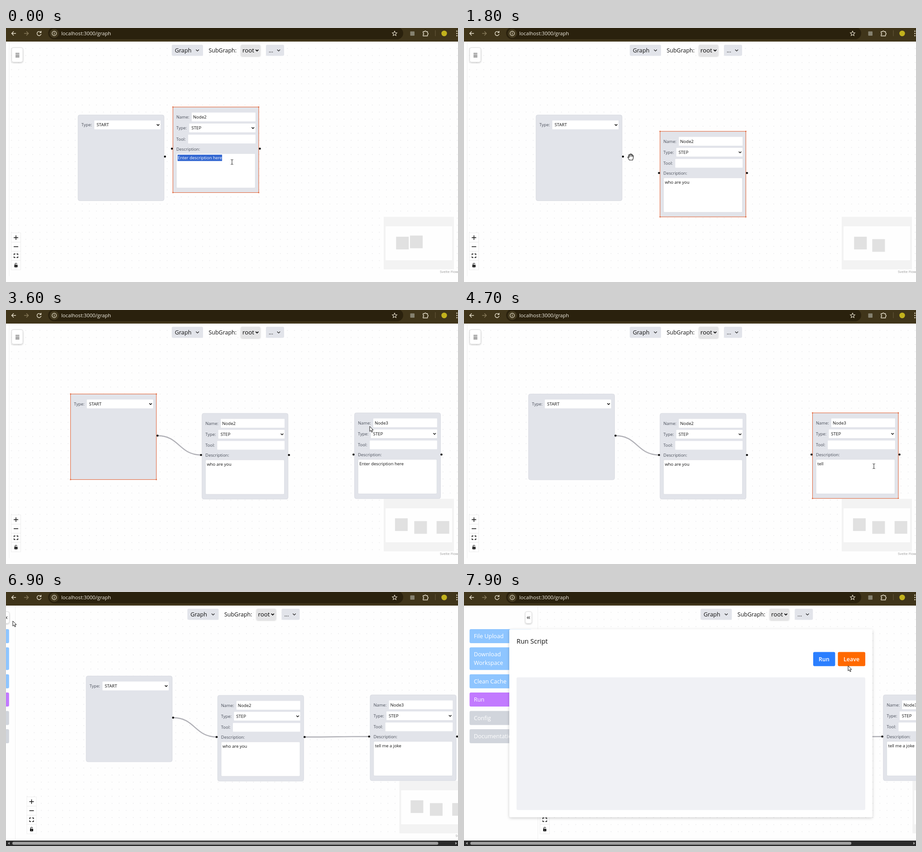
Animation, 998 px wide and 561 px high, one loop 8 s. Source, as an HTML page:

```html
<!DOCTYPE html>
<html lang="en">
<head>
<meta charset="utf-8">
<title>Graph editor</title>
<style>
  html, body { margin: 0; width: 100%; height: 100%; overflow: hidden; background: #fefefe; }
  svg { display: block; position: absolute; left: 0; top: 0; }
  text { font-family: "Open Sans", "Noto Sans", sans-serif; white-space: pre; }
</style>
</head>
<body>
<svg id="stage" width="998" height="561" viewBox="0 0 998 561" xmlns="http://www.w3.org/2000/svg">
  <defs>
    <pattern id="dots" x="4.4" y="37.2" width="15.62" height="15.62" patternUnits="userSpaceOnUse">
      <circle cx="7.8" cy="7.8" r=".55" fill="#b4b4ba"/>
    </pattern>
    <filter id="soft" x="-20%" y="-20%" width="140%" height="150%">
      <feDropShadow dx="0" dy="1.2" stdDeviation="1.5" flood-opacity=".22"/>
    </filter>
    <filter id="deep" x="-5%" y="-5%" width="110%" height="112%">
      <feDropShadow dx="0" dy="2" stdDeviation="3" flood-opacity=".2"/>
    </filter>
  </defs>
  <g id="page"></g>
  <g id="browser"></g>
  <g id="pointer"></g>
</svg>
<script>
const LOOP = 8000, STEP = 100;
const GREY = '#e2e4ea', EDGE = '#b1b1b7', LABEL = '#4a4f5a', ORANGE = '#e0673c';

// Tracks: [time, x, y, kind]
const tracks = {
  start: [[1900, 159, 192], [2400, 207.5, 211], [2700, 142.5, 185.5]],
  node2: [[1200, 368.5, 174.5], [1500, 432.8, 228.2]],
  shift: [[6800, 0, -156], [6900, 34.5, -142.5], [7000, 99, -76], [7100, 145, -18], [7200, 156.3, 0]],
  cursor: [
    [0, 499, 296, 'beam'], [1000, 499, 296, 'beam'],
    [1200, 480, 267, 'hand'], [1500, 544, 321, 'hand'], [1800, 368, 285, 'hand'],
    [1900, 348, 283, 'cross'], [2400, 396, 302, 'cross'], [2700, 331, 277, 'cross'],
    [2800, 335, 278, 'cross'], [3000, 430, 320, 'cross'], [3100, 520, 300, 'hand'],
    [3400, 800, 254, 'arrow'], [3600, 803, 257, 'arrow'], [3800, 803, 237, 'hand'],
    [4100, 905, 345, 'beam'], [5200, 905, 345, 'beam'], [5400, 720, 370, 'hand'],
    [5700, 625, 320, 'cross'], [5800, 645, 320, 'hand'], [6200, 739, 321, 'hand'],
    [6300, 767, 319, 'cross'], [6400, 720, 300, 'arrow'], [6700, 25, 62, 'arrow'],
    [6900, 15, 64, 'arrow'], [7300, 60, 238, 'arrow'], [7500, 70, 238, 'arrow'],
    [7900, 848, 163, 'arrow']
  ]
};

function at(track, t) {
  let a = track[0];
  for (const b of track) {
    if (t < b[0]) {
      const k = Math.max(0, (t - a[0]) / (b[0] - a[0] || 1));
      return { x: a[1] + (b[1] - a[1]) * k, y: a[2] + (b[2] - a[2]) * k, kind: a[3] };
    }
    a = b;
  }
  return { x: a[1], y: a[2], kind: a[3] };
}

const rect = (x, y, w, h, fill, r = 0, more = '') =>
  `<rect x="${x}" y="${y}" width="${w}" height="${h}" rx="${r}" fill="${fill}" ${more}/>`;
const text = (x, y, s, size, fill = '#111', more = '') =>
  `<text x="${x}" y="${y}" font-size="${size}" fill="${fill}" ${more}>${s}</text>`;
const line = (d, color, w = 1, more = '') =>
  `<path d="${d}" fill="none" stroke="${color}" stroke-width="${w}" ${more}/>`;
const dot = (x, y, r = 2.3, fill = '#111') => `<circle cx="${x}" cy="${y}" r="${r}" fill="${fill}"/>`;
const chevron = (x, y, s = 3, color = '#111', w = 1.5) =>
  line(`M${x - s} ${y - s / 2}l${s} ${s}l${s} ${-s}`, color, w);
const move = (x, y, body) => `<g transform="translate(${x} ${y})">${body}</g>`;

function frame(selected) {
  if (!selected) return rect(0, 0, 190, 189.5, GREY, 4, 'stroke="#d3d6dd" stroke-width=".8"');
  const corners = [[0, 0], [189.5, 0], [0, 189], [189.5, 189]];
  return rect(0, 0, 189.5, 189, GREY, 0, `stroke="${ORANGE}" stroke-width="1.1"`) +
    corners.map(([x, y]) => rect(x - 1.2, y - 1.2, 2.4, 2.4, ORANGE)).join('');
}

function field(label, y, x, value, select) {
  return text(7.5, y + 3.4, label, 9.4, LABEL) + rect(x, y - 9.7, 182.3 - x, 19.4, '#fff', 1) +
    text(x + (select ? 5 : 3), y + 3.4, value, 9.6) + (select ? chevron(176.7, y, 2.8) : '');
}

function startNode(p, selected) {
  return move(p.x, p.y, frame(selected) + field('Type:', 22, 36, 'START', true) + dot(192, 92));
}

function stepNode(p, name, note, selected, marked) {
  return move(p.x, p.y, frame(selected) +
    field('Name:', 22, 41.5, name) + field('Type:', 46.2, 36, 'STEP', true) +
    field('Tool:', 70.7, 33.7, '') + text(7.5, 96, 'Description:', 9.4, LABEL) +
    rect(7.8, 102.8, 174, 76, '#fff', 2, 'stroke="#d9dbe0" stroke-width=".8"') +
    (marked ? rect(10.3, 105.3, 98.3, 14, '#3367d1') : '') +
    text(10.7, 115.8, note, 9.45, marked ? '#fff' : '#111') +
    dot(-2.2, 92) + dot(192, 92));
}

function wire(x1, y1, x2, y2, w) {
  const m = (x1 + x2) / 2;
  return line(`M${x1} ${y1}C${m} ${y1} ${m} ${y2} ${x2} ${y2}`, EDGE, w);
}

function header() {
  return rect(366, 37, 69, 24.5, GREY, 3) + text(372.7, 53.8, 'Graph', 12.7) + chevron(422.7, 49.3, 3.2, '#222', 1.3) +
    text(447.5, 53.8, 'SubGraph:', 12.45) +
    rect(518.5, 37, 43, 24.5, '#e4e4e5', 3, 'filter="url(#soft)"') +
    text(522, 53.8, 'root', 13.3, '#000', 'font-weight="500"') + chevron(554.3, 49.3, 3, '#000', 1.8) +
    rect(574, 37, 40, 24.5, GREY, 3) + text(580, 53.8, '...', 12.5) + chevron(602, 49.3, 3.2, '#222', 1.3);
}

function miniMap(nodes) {
  return rect(834, 417, 155, 116, '#f3f3f3') + rect(838, 438, 147, 75, '#fefefe') +
    nodes.map(n => rect(838 + n.x * .1465, 432.9 + n.y * .1465, 28, 28, '#e1e1e1')).join('');
}

function controls() {
  const rows = [473, 493, 513].map(y => line(`M11.5 ${y}h21`, '#e9e9e9')).join('');
  return rect(11.5, 452.5, 21, 81.5, '#fefefe', 0, 'stroke="#eee"') + rows +
    line('M17 463h10M22 458v10M17 483h10', '#111', 1.4) +
    line('M17.7 501.5v-2.5h3M23.3 499h3v2.5M26.3 504.5v2.5h-3M20.7 507h-3v-2.5', '#111', 1.4) +
    rect(18.5, 523, 7, 5.5, '#111', 1) + line('M20 523v-1.5a2 2 0 0 1 4 0', '#111', 1.2) + dot(22, 525.7, .8, '#fff');
}

function sidebar(x, open) {
  const items = [
    [82, 31, '#8ec5ff', ['File Upload']], [122.3, 50, '#8ec5ff', ['Download', 'Workspace']],
    [181.7, 31, '#8ec5ff', ['Clean Cache']], [222, 31, '#c27aff', ['Run']],
    [262.7, 31, '#d1d5dc', ['Config']], [303, 31, '#d1d5dc', ['Documentation']]
  ];
  const buttons = items.map(([y, h, color, words]) => rect(12.3, y, 137, h, color, 3) +
    words.map((w, i) => text(21.8, y + 20 + i * 18.8, w, 12.6, '#fff')).join('')).join('');
  const toggle = rect(135.3, 43.3, 14.4, 26, '#fff', 4, 'stroke="#dcdcdc" filter="url(#soft)"') +
    line('M142 54.2l-2.6 2.6l2.6 2.6M145.4 54.2l-2.6 2.6l2.6 2.6', '#222', 1.1);
  return move(x, 0, rect(-10, 30, 173, 531, '#fefefe') + line('M163 30V548', '#f0f0f0') + (open ? buttons + toggle : ''));
}

function menuButton() {
  return rect(12.7, 43.3, 24.5, 32, '#fff', 4, 'stroke="#d9d9d9" filter="url(#soft)"') +
    line('M21 56h8.5M21 59.8h8.5M21 63.6h8.5', '#111', 1.2);
}

function scrollBar(dx) {
  const w = 973 * 998 / (998 + dx);
  return rect(0, 549, 998, 12, '#2b2b2b') + rect(14, 551.7, w - 32 + 32, 6.6, '#9f9f9f', 3.3) +
    '<path d="M8 552v6l-4-3zM992 552v6l4-3z" fill="#a5a5a5"/>';
}

function dialog() {
  return rect(100, 82.3, 801.7, 415, '#fff', 3, 'filter="url(#deep)"') +
    text(116, 113.7, 'Run Script', 14.5, '#111', 'font-weight="500"') +
    rect(771, 132.5, 48.5, 31.3, '#2b7fff', 3) + text(783, 152.7, 'Run', 12.5, '#fff', 'font-weight="600"') +
    rect(825.5, 132.5, 60.5, 31.3, '#ff6900', 3) + text(838, 152.7, 'Leave', 12.5, '#fff', 'font-weight="600"') +
    rect(116, 188.5, 770, 293, '#f0f1f5', 3);
}

function browser() {
  const ink = '#e9e2cf';
  return rect(0, 0, 998, 30, '#40351a') + rect(93, -2, 784, 27, '#2a210d', 13.5) +
    line('M22 12h-9M17 7.5l-4.5 4.5l4.5 4.5', ink, 1.4) +
    line('M40 12h9M45 7.5l4.5 4.5l-4.5 4.5', '#85795a', 1.4) +
    line('M76.6 9.2a4.6 4.6 0 1 0 1 4M77.5 6.5v3.6h-3.6', ink, 1.4) +
    dot(106.5, 12, 10, '#43391f') + `<circle cx="106.5" cy="12" r="4.8" fill="none" stroke="${ink}" stroke-width="1.2"/>` +
    line('M106.5 11.3v3.2M106.5 9.2v1.3', ink, 1.2) +
    text(122, 16, 'localhost:3000/graph', 11.2, '#f3efe4') +
    line('M858 6.8l1.5 3.4l3.7.4l-2.8 2.5l.8 3.7l-3.2-1.9l-3.2 1.9l.8-3.7l-2.8-2.5l3.7-.4z', ink, 1.1) +
    rect(892.5, 7.5, 9.5, 9.5, '#85816f', 1) +
    line('M921 8h3.2a1.6 1.6 0 0 1 3.2 0h3.3v3.2a1.6 1.6 0 0 1 0 3.2v3.1h-9.7v-3a1.6 1.6 0 0 0 0-3.2z', ink, 1.3) +
    line('M948 5v13', '#695d3d') + dot(967.5, 12, 6.2, '#c2b21d') +
    [7, 12, 17].map(y => dot(995.5, y, 1.3, ink)).join('');
}

const cursors = {
  beam: line('M-2.5 -5.5q2.5 0 2.5 1.5v8q0 1.5 -2.5 1.5M2.5 -5.5q-2.5 0 -2.5 1.5M0 4q0 1.5 2.5 1.5', '#222', 1),
  cross: line('M-9.5 0h19M0 -9v18', '#fff', 2.6) + line('M-9.5 0h19M0 -9v18', '#111', 1.4),
  hand: '<path d="M-3 6.8C-4 4-6.6 1.7-6.4.3c.4-1.2 1.8-.7 2.9.9L-4.7-3.5c-.3-1.6 1.5-2 2-.5l.4 1.2V-5.6c.1-1.6 2-1.6 2.2 0V-6c.2-1.4 2.1-1.3 2.2.2v1.2c.5-1.3 2-1 2.1.4v1.6c.5-1 1.9-.7 1.9.6C6.1 2 5.5 3.8 4.4 6.8z" fill="#fff" stroke="#111" stroke-width="1.1" stroke-linejoin="round"/>' +
    line('M-2.3 -3v2.6M0 -5.5v4.6M2.2 -5v4.3M4.2 -2.8v2.4', '#111', .9),
  arrow: '<path d="M0 0V11.2L2.6 8.8L4.4 13L6.3 12.2L4.5 8.1H8z" fill="#fff" stroke="#111" stroke-width="1" stroke-linejoin="round"/>'
};

// Text after typing over a chosen one between two times
function typed(s, t, from, to) {
  const n = Math.round(s.length * Math.min(1, (t - from) / (to - from)));
  return n > 0 ? s.slice(0, n) : 'Enter description here';
}

function draw(t) {
  const start = at(tracks.start, t), node2 = at(tracks.node2, t), node3 = { x: 769.5, y: 227.2 };
  const { x: dx, y: sideX } = at(tracks.shift, t), cur = at(tracks.cursor, t);
  const open = t >= 6800, third = t >= 3500;
  const s = [start.x + 192, start.y + 92], n2 = [node2.x, node2.y + 92];
  const a = [...s, n2[0] - 2.2, n2[1]];
  const b = [n2[0] + 192, n2[1], node3.x - 2.2, node3.y + 92];

  let wires = '';
  if (t >= 3000) wires += wire(...a, 2.4);
  else if (t >= 2800) wires += wire(...s, cur.x, cur.y, .9);
  if (t >= 6400) wires += wire(...b, 2.4);
  else if (t >= 5800) wires += wire(b[0], b[1], cur.x - 4, cur.y + 1, .9);

  const nodes = startNode(start, t >= 1900 && t < 3800) +
    stepNode(node2, 'Node2', typed('who are you', t, 0, 900), t < 1900, t < 100) +
    (third ? stepNode(node3, 'Node3', typed('tell me a joke', t, 4500, 5200),
      t >= 3800 && t < 5400, t >= 4300 && t < 4600) : '');
  const mini = miniMap(third ? [start, node2, node3] : [start, node2]);

  page.innerHTML = rect(0, 30, 998, 531, '#fefefe') +
    move(dx, 0, rect(7, 30, 1000, 514, 'url(#dots)') + wires + nodes + mini + controls() +
      text(958, 541, 'Svelte Flow', 7.8, '#999') + header()) +
    sidebar(sideX, open) +
    (open ? scrollBar(dx) : menuButton()) + (t >= 7500 ? dialog() : '');
  pointer.innerHTML = move(cur.x, cur.y, cursors[cur.kind]);
}

const page = document.getElementById('page'), pointer = document.getElementById('pointer');
document.getElementById('browser').innerHTML = browser();
const began = performance.now();
let last = -1;

function tick() {
  const t = Math.floor(((performance.now() - began) % LOOP) / STEP) * STEP;
  if (t !== last) draw(last = t);
  requestAnimationFrame(tick);
}
tick();
</script>
</body>
</html>
```
